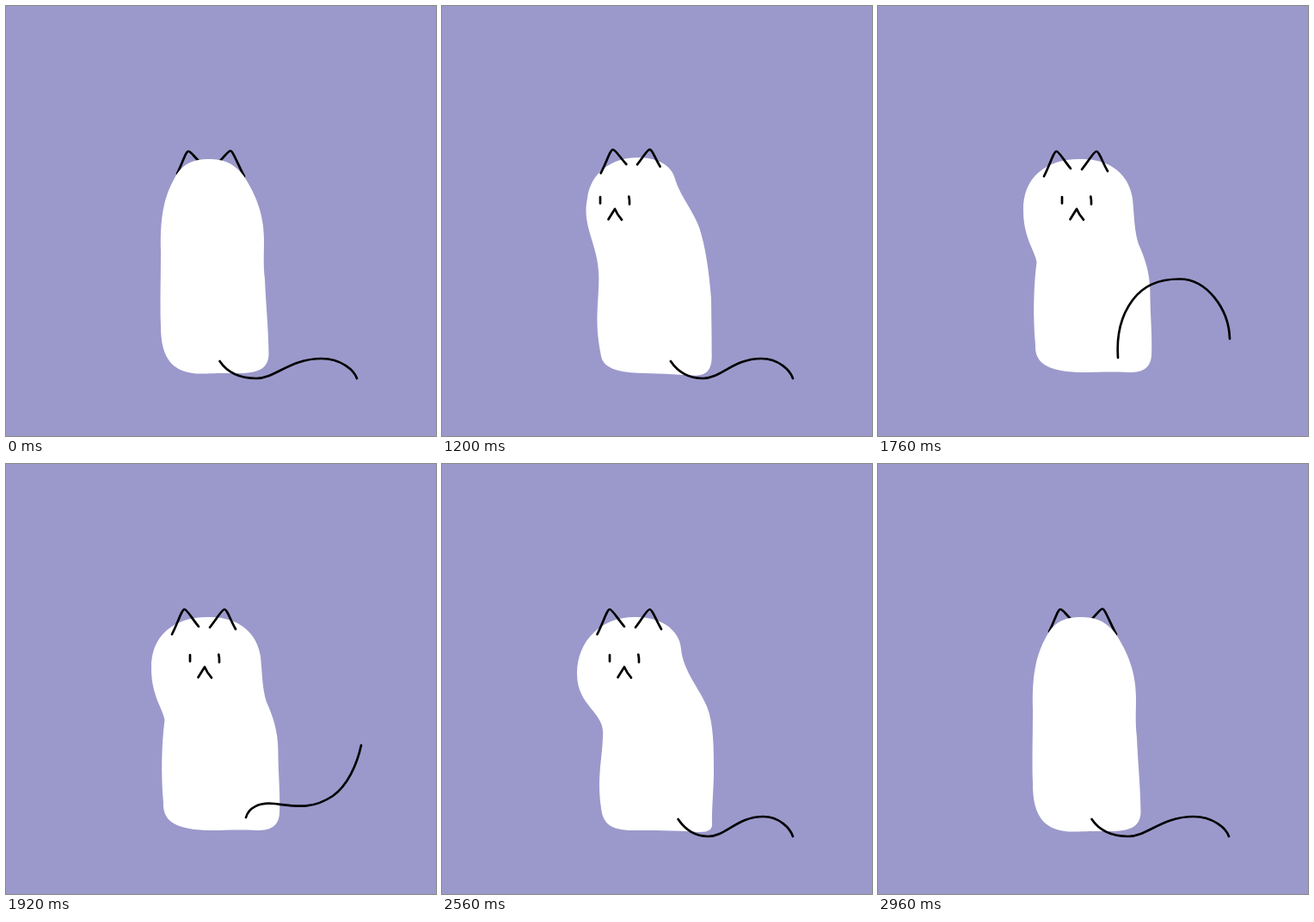
Write an HTML page that moves like this. It is 500 px wide and 500 px high and loops after 3200 ms.

```html
<!DOCTYPE html>
<html lang="en">
<head>
<meta charset="utf-8">
<title>Cat</title>
<style>
  html, body { margin: 0; height: 100%; overflow: hidden; background: #9b99cb; }
  svg { display: block; width: 100%; height: 100%; }
  path { fill: none; stroke: #000; stroke-width: 2.7; stroke-linecap: round; stroke-linejoin: round; }
  #body { fill: #fff; stroke: none; }
</style>
</head>
<body>
<svg viewBox="0 0 500 500">
  <path id="earsBehind"/>
  <path id="body"/>
  <path id="earsFront"/>
  <path id="face" d="M214 222V229.5M247.3 221.5Q248.3 226 248 230.5M223.5 248L231 236Q234 243 239 248.5"/>
  <path id="tail"/>
</svg>
<script>
const LOOP = 3200, STEP = 80;
const part = id => document.getElementById(id);

// Blends two paths that share the same commands.
function mix(a, b, t) {
  const to = b.match(/-?[\d.]+/g);
  let i = 0;
  return a.replace(/-?[\d.]+/g, n => +(+n + (to[i++] - n) * t).toFixed(2));
}

function ear(x0, y0, tipX, tipY, x1, y1) {
  const mid = (a, b) => (a + b) / 2;
  return `M${x0} ${y0}C${mid(x0, tipX)} ${mid(y0, tipY)} ${tipX - 3} ${tipY} ${tipX} ${tipY}` +
    `C${tipX + 3} ${tipY} ${mid(tipX, x1)} ${mid(tipY, y1)} ${x1} ${y1}`;
}

const backTail = "M248.5 413C258 427 273 433 291 433C313 433 330 410 367 410C390 410 405 424 408 433";
const frontTail = "M279.5 413C289 427 299 433 313 433C334 433 345 410 375 410C393 410 405 424 408 433";

const back = {
  body: "M235 178C255 177 268 186 276 197C290 218 300 242 300 272C300 290 299 300 301 318C302 345 305 372 305.5 405C305 420 296 427 270 427C255 427 245 427 232 427.5C195 429 180 412 180 372C179 345 180 320 180 285C179 240 185 218 199 195C207 183 219 178 235 178Z",
  ears: ear(199, 195, 212, 169, 224, 180) + ear(249, 180, 261, 168.5, 277, 198),
  tail: backTail
};
const lean = {
  body: "M235 173C244 173 252 174 258 177C271 184 279 194 282 211C287 236 300 268 307 298C310 320 313 355 313 385C312 416 304 433 288 433C268 433 255 429 241 428C225 426 185 430 184 416C172 374 173 365 173 320C168 260 171 205 193 184C203 176 217 173 235 173Z",
  ears: ear(193, 187, 206, 163, 219, 174) + ear(231, 173, 241.5, 162.5, 251, 176),
  tail: backTail
};
const side = {
  body: "M223 178C252 177 276 191 278 215C280 240 300 262 308 282C316 302 316 330 316 362C315 390 314 400 314 416C315 425 311 428 298 428C270 426 245 426 222 426C195 426 187 417 185 400C180 365 186 345 187 318C191 288 157 283 157 244C157 203 188 178 223 178Z",
  ears: ear(180.5, 198, 195, 169, 212, 189) + ear(225, 190, 241.5, 169, 255, 192),
  tail: mix(backTail, frontTail, 0.84),
  face: -19
};
const front = {
  body: "M234 178C270 177 292 196 296 224C298 244 298 262 303 277C311 295 317 312 316.5 340C317 365 319 385 318 406C317 421 308 426 292 426C270 425 255 426 236 426C200 425 182 417 183 394C180 360 181 325 184.5 298C183 285 169 270 169 238C168 200 195 178 234 178Z",
  ears: ear(193, 198, 207.5, 169, 224, 189) + ear(237, 190, 254, 169, 267, 192),
  tail: frontTail,
  face: 0
};

// The tail arches up, whips its tip over and sags below rest.
const arch = "M279 409C277 380 284 358 296 342C307 327 325 317.5 350 317.5C382 317 408 352 409 387";
const tailSwing = [
  mix(frontTail, arch, 0.33),
  mix(frontTail, arch, 0.7),
  arch,
  "M279 410C271 385 281 363 302 352C325 340 350 348 372 340C395 332 411 315 415.5 294",
  "M279 411C282 400 294 393 312 395C338 398 356 402 380 386C397 374 408 350 413 327",
  "M279 412C290 424 300 428 318 428C345 428 365 426 385 412C398 402 404 390 409 372",
  "M279.5 413C288 427 303 440 325 443C350 445 380 440 392 430C398 425 404 417 408 410"
];

// amount 0 leans away, 1 looks over the shoulder.
function turn(amount) {
  const pose = {};
  for (const key of ["body", "ears", "tail"]) pose[key] = mix(lean[key], side[key], amount);
  if (amount >= 0.5) pose.face = -19 - 33 * (1 - amount);
  return pose;
}

function poseAt(time) {
  const since = start => Math.floor((time - start) / STEP);
  if (time < 1040 || time >= 2960) return back;
  if (time < 1360) return turn(since(1040) / 3);
  if (time >= 2560) return turn(1 - since(2560) / 4);
  if (time >= 1600 && time < 2160) return { ...front, tail: tailSwing[since(1600)] };
  return front;
}

function draw(now) {
  const pose = poseAt(now % LOOP);
  const facing = pose.face !== undefined;
  part("body").setAttribute("d", pose.body);
  part("tail").setAttribute("d", pose.tail);
  part("earsBehind").setAttribute("d", facing ? "" : pose.ears);
  part("earsFront").setAttribute("d", facing ? pose.ears : "");
  part("face").setAttribute("visibility", facing ? "visible" : "hidden");
  part("face").setAttribute("transform", `translate(${pose.face || 0} 0)`);
  requestAnimationFrame(draw);
}
draw(performance.now());
</script>
</body>
</html>
```
